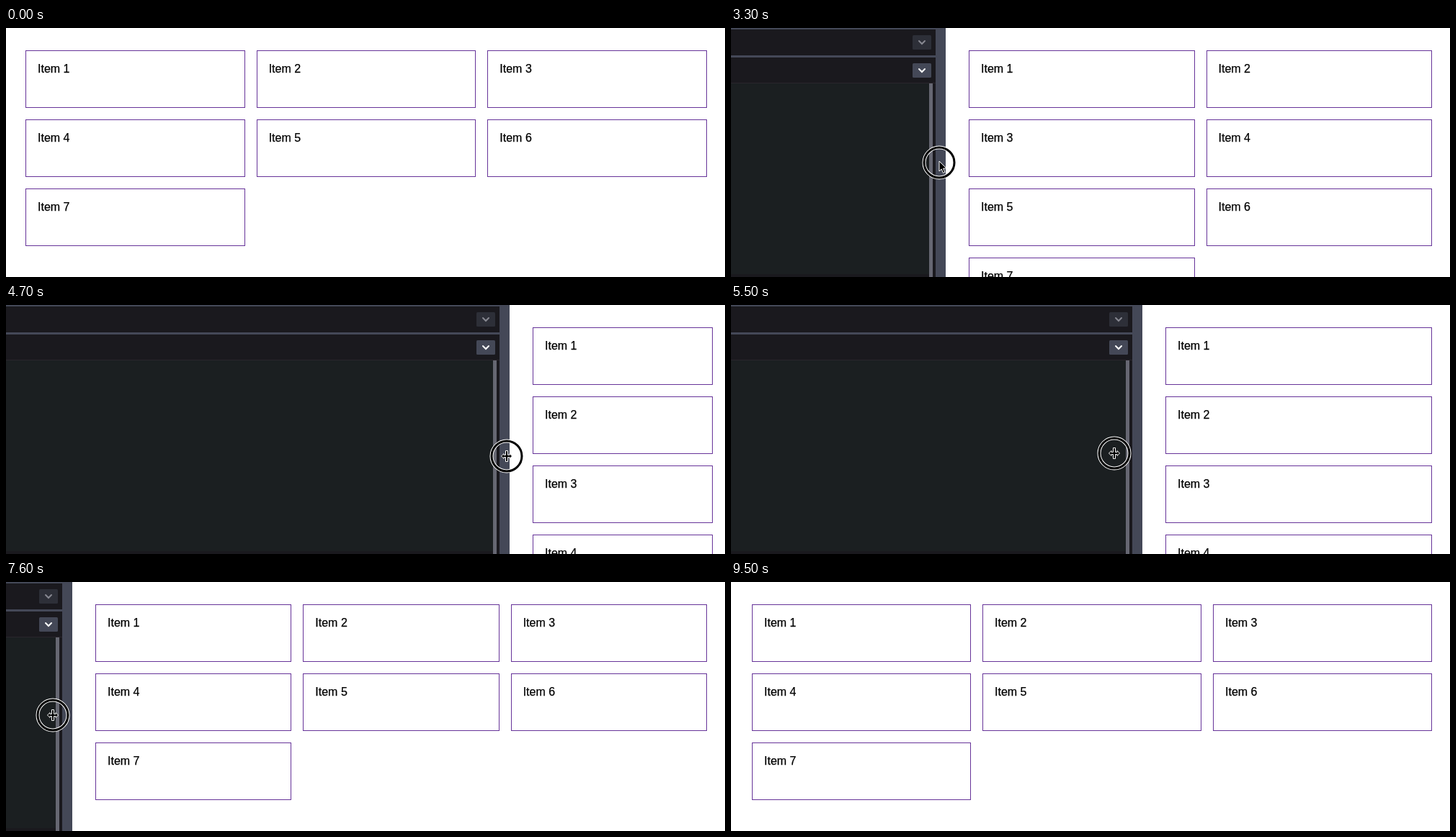
Animation, 998 px wide and 346 px high, one loop 9800 ms. Source, as an HTML page:

```html
<!DOCTYPE html>
<html lang="en">
<head>
<meta charset="utf-8">
<title>Responsive grid</title>
<style>
  html, body { margin: 0; width: 100%; height: 100%; overflow: hidden; background: #fff; }
  #stage { position: relative; width: 998px; height: 346px; overflow: hidden; }
  #grid {
    position: absolute; top: 31px; display: grid; gap: 16px;
    grid-template-columns: repeat(auto-fill, minmax(250px, 1fr));
    font: 16px "Liberation Sans", Arial, sans-serif; color: #000;
    -webkit-text-stroke: .25px #000;
  }
  #grid div { box-sizing: border-box; height: 80px; padding: 16px; border: 1px solid #639; }
  #pane, #cursor { position: absolute; left: 0; top: 0; overflow: visible; }
</style>
</head>
<body>
<div id="stage">
  <div id="grid"></div>

  <!-- The pane's right edge sits at x = 0 and is moved as a whole -->
  <svg id="pane" width="1" height="346">
    <rect x="-1000" width="1000" height="346" fill="#444857"/>
    <g fill="#1a191e">
      <rect x="-1000" y="2" width="986" height="36"/>
      <rect x="-1000" y="41" width="986" height="305"/>
    </g>
    <rect x="-1000" y="76" width="986" height="1" fill="#2a262c"/>
    <rect x="-1000" y="77" width="977" height="265" fill="#1b1f21"/>
    <rect x="-23" y="77" width="5" height="269" fill="#666772"/>
    <rect x="-46" y="10" width="26" height="20" rx="1.5" fill="#2d2f38"/>
    <rect x="-46" y="49" width="26" height="20" rx="1.5" fill="#444857"/>
    <g fill="none" stroke-width="2" stroke-linecap="round">
      <path d="M-37 18l4 4 4-4" stroke="#878891"/>
      <path d="M-37 57l4 4 4-4" stroke="#fff"/>
    </g>
  </svg>

  <svg id="cursor" width="1" height="1">
    <g fill="none">
      <circle r="21" stroke="#fff" stroke-width="5"/>
      <circle r="21" stroke="#000" stroke-width="3"/>
    </g>
    <path id="arrow" d="M0-2V12l3.2-3 2.3 5.4 2.4-1-2.3-5.3H10Z" stroke="#fff"/>
    <path id="resize" stroke="#fff"
      d="M-7.5 0l3.5-3.5v2h2.5v-6h3v6h2.5v-2L7.5 0l-3.5 3.5v-2h-2.5v6h-3v-6h-2.5v2Z"/>
  </svg>
</div>

<script>
  const LOOP = 9800, STEP = 100;
  const LEAD = 75; // ms by which the pane trails the pointer
  const GRIP = 9;  // pointer's distance from the pane edge

  const easeIn = p => p ** 1.48;
  const easeOut = p => Math.sin(p * Math.PI / 2);
  const easeInOut = p => (1 - Math.cos(p * Math.PI)) / 2;

  const rest = { edge: -5, y: 176 };
  const drags = [
    { from: 1200, to: 2800, edge: 298, y: 187, ease: easeIn },
    { from: 3375, to: 4891, edge: 707, y: 210, ease: easeOut },
    { from: 4900, to: 6400, edge: 313, y: 201, ease: easeInOut },
    { from: 6900, to: 8320, edge: -3, y: 180, ease: easeOut }
  ];

  const el = id => document.getElementById(id);
  const grid = el('grid'), pane = el('pane'), cursor = el('cursor');
  const show = (node, on) => { node.style.display = on ? '' : 'none'; };

  for (let i = 1; i <= 7; i++) {
    const item = document.createElement('div');
    item.textContent = 'Item ' + i;
    grid.append(item);
  }

  function pose(t) {
    let { edge, y } = rest;
    for (const drag of drags) {
      const p = Math.min(1, Math.max(0, (t - drag.from) / (drag.to - drag.from)));
      const k = drag.ease(p);
      edge += (drag.edge - edge) * k;
      y += (drag.y - y) * k;
    }
    return { edge: Math.round(edge), y: Math.round(y) };
  }

  function draw(now) {
    const t = Math.floor(now % LOOP / STEP) * STEP;
    const { edge } = pose(t), pointer = pose(t + LEAD);
    const left = edge + 32;
    grid.style.left = left + 'px';
    grid.style.width = 973 - left + 'px';
    pane.style.transform = `translateX(${edge}px)`;
    cursor.style.transform = `translate(${pointer.edge - GRIP}px, ${pointer.y}px)`;
    show(cursor, t >= 700 && t < 9500);
    show(el('arrow'), t < drags[1].from);
    show(el('resize'), t >= drags[1].from);
  }

  const start = performance.now();
  function tick() {
    draw(performance.now() - start);
    requestAnimationFrame(tick);
  }
  tick();
</script>
</body>
</html>
```
